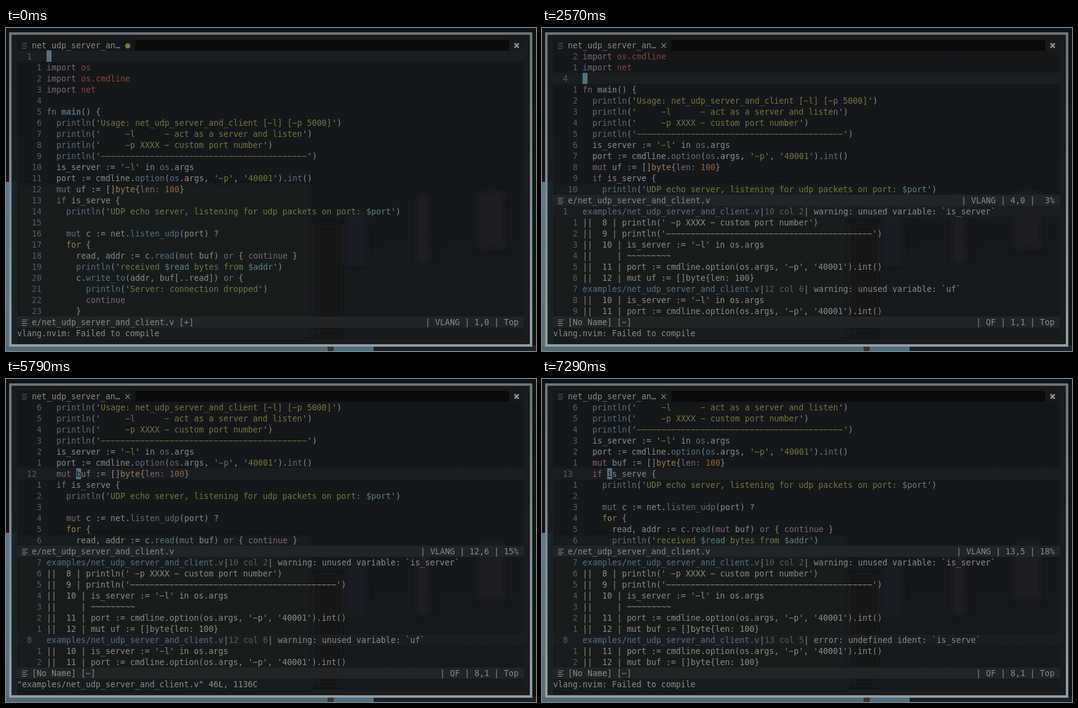
Animation of 862 by 525 pixels, one loop 8 s. Source, as an HTML page:

```html
<!DOCTYPE html>
<html lang="en">
<head>
<meta charset="utf-8">
<title>Editor session</title>
<style>
  html, body { margin: 0; width: 100%; height: 100%; overflow: hidden; background: #0d151a; }
  svg { display: block; width: 862px; height: 525px; }
  text { font: 13.288px "DejaVu Sans Mono", "Liberation Mono", monospace; white-space: pre; }
</style>
</head>
<body>
<svg viewBox="0 0 862 525" xmlns="http://www.w3.org/2000/svg">
  <defs>
    <linearGradient id="sky" x1="0" y1="0" x2="0" y2="1">
      <stop offset="0" stop-color="#4f7f95"/><stop offset="1" stop-color="#54737f"/>
    </linearGradient>
    <linearGradient id="edge" x1="0" y1="0" x2="0" y2="1">
      <stop offset="0" stop-color="#707476"/><stop offset="1" stop-color="#989c9e"/>
    </linearGradient>
    <linearGradient id="pane" x1="0" y1="0" x2="0" y2="1">
      <stop offset="0" stop-color="#141618"/><stop offset="1" stop-color="#15191c"/>
    </linearGradient>
    <filter id="soft"><feGaussianBlur stdDeviation="4"/></filter>
  </defs>
  <rect width="862" height="525" fill="#0d151a"/>
  <rect y="250" width="9" height="275" fill="url(#sky)"/>
  <rect y="516" width="523" height="9" fill="#4c6a77"/>
  <rect x="523" y="516" width="10" height="9" fill="#3a302d"/>
  <rect x="533" y="516" width="65" height="9" fill="#4a7083"/>
  <rect x="598" y="516" width="264" height="9" fill="#18242b"/>
  <rect x="7" y="9" width="847" height="507" fill="#171c1f"/>
  <rect x="9" y="250" width="9" height="264" fill="#1a252b"/>
  <rect x="18" y="19" width="824" height="486" fill="url(#pane)"/>
  <g filter="url(#soft)">
    <rect x="20" y="255" width="475" height="248" fill="#151b1f"/>
    <rect x="504" y="318" width="40" height="180" fill="#121619"/>
    <rect x="553" y="295" width="34" height="90" fill="#191d20"/>
    <rect x="668" y="272" width="20" height="110" fill="#1b1f22"/>
    <rect x="768" y="266" width="42" height="92" fill="#1a1e21"/>
  </g>
  <rect x="7" y="9" width="847" height="507" fill="none" stroke="url(#edge)" stroke-width="4"/>
  <g id="screen"></g>
</svg>
<script>
const LOOP = 8000, CELL = 8, ROW = 18, LEFT = 18, TOP = 19, TEXT_X = 66;
const COLORS = {
  f: '#8a8c8a', p: '#7b6880', r: '#854640', b: '#586f82', o: '#8f6440',
  y: '#94804f', g: '#727840', c: '#5f837f', n: '#565b5e', m: '#586f82'
};
const CURSOR = '#587083';
const screen = document.getElementById('screen');

// "^k" switches the colour to key k.
const rule = '-'.repeat(42);
const say = (pad, s) => `${pad}^bprintln^f('^g${s}^f')`;
const code = [
  '^pimport ^ros',
  '^pimport ^ros.cmdline',
  '^pimport ^rnet',
  '',
  '^pfn ^mmain^f() {',
  say('  ', 'Usage: net_udp_server_and_client [-l] [-p 5000]'),
  say('  ', '     -l      - act as a server and listen'),
  say('  ', '     -p XXXX - custom port number'),
  say('  ', rule),
  "  is_server := '^g-l^f' in ^bos^f.args",
  "  port := cmdline.^boption^f(^bos^f.args, '^g-p^f', '^g40001^f').^bint^f()",
  '  ^pmut^f uf := []^ybyte^f{^plen: ^o100^f}',
  '  ^pif^f is_serve {',
  say('    ', 'UDP echo server, listening for udp packets on port: ^c$port'),
  '',
  '    ^pmut^f c := net.^blisten_udp^f(port) ?',
  '    ^yfor^f {',
  '      read, addr := c.^bread^f(^pmut^f buf) ^por^f { ^pcontinue^f }',
  say('      ', 'received ^c$read^g bytes from ^c$addr'),
  '      c.^bwrite_to^f(addr, buf[..read]) ^por^f {',
  say('        ', 'Server: connection dropped'),
  '        ^pcontinue',
  '      }'
];
const before = ['', ...code];
const fixed = code.map(s => s.replace(' uf ', ' buf '));

const plain = s => s.replace(/\^./g, '');
const issue = (where, msg) => `^bexamples/net_udp_server_and_client.v^f|^n${where}^f| ${msg}`;
function report(src, where, msg) {
  const quote = n => `||  ${n} | ${plain(src[n - 1]).trim().replace(/\s+/g, ' ')}`;
  const at = parseInt(where) - 2;
  return [
    issue('10 col 2', 'warning: unused variable: `is_server`'),
    quote(8), quote(9), quote(10), '||     | ' + '~'.repeat(9), quote(11), quote(12),
    issue(where, msg), quote(at), quote(at + 1)
  ];
}
const unused = report(code, '12 col 6', 'warning: unused variable: `uf`');
const undef = report(fixed, '13 col 5', 'error: undefined ident: `is_serve`');

const failed = 'vlang.nvim: Failed to compile';
const wrote = '"examples/net_udp_server_and_client.v" 46L, 1136C';

// Each step changes some fields of the editor state.
const steps = [
  { t: 0, src: before, top: 1, line: 1, col: 0, pos: '1,0', pct: 'Top', dirty: true, cmd: failed },
  { t: 570, line: 2, pos: '2,1' },
  { t: 1140, line: 3, pos: '3,1' },
  { t: 1500, line: 4, pos: '4,1' },
  { t: 2570, src: code, top: 2, pos: '4,0', pct: ' 3%', dirty: false, list: unused, item: 1 },
  { t: 3710, top: 6, line: 12, col: 6, pos: '12,6', pct: '15%', item: 8 },
  { t: 5000, insert: true },
  { t: 5210, src: fixed, col: 7, pos: '12,7', dirty: true },
  { t: 5360, insert: false, col: 6 },
  { t: 5430, pos: '12,6' },
  { t: 5790, dirty: false, cmd: wrote },
  { t: 5860, list: undef, item: 1 },
  { t: 5930, cmd: failed },
  { t: 7290, top: 7, line: 13, col: 5, pos: '13,5', pct: '18%', item: 8 }
];
const states = [];
steps.forEach((s, i) => states.push({ ...states[i - 1], ...s }));

const rowY = r => TOP + r * ROW;
const escape = s => s.replace(/&/g, '&amp;').replace(/</g, '&lt;');
const rect = (x, y, w, h, fill) => `<rect x="${x}" y="${y}" width="${w}" height="${h}" fill="${fill}"/>`;
const bar = (r, fill, x = LEFT, end = 842) => rect(x, rowY(r), end - x, ROW, fill);

// The terminal face has wide hyphens, so they are set as minus signs.
function text(x, r, s, color = 'f') {
  let col = 0;
  const spans = ('^' + color + s).split('^').slice(1).map(part => {
    const key = part[0], body = part.slice(1);
    const span = `<tspan x="${x + col * CELL}" fill="${COLORS[key]}"` +
      `${key === 'm' ? ' font-weight="bold"' : ''}>${escape(body.replace(/-/g, '\u2212'))}</tspan>`;
    col += body.length;
    return body ? span : '';
  });
  return `<text y="${rowY(r) + 14}">${spans.join('')}</text>`;
}

function icon(r, color) {
  const y = rowY(r);
  return `<path d="M26 ${y + 5.5}h9M26 ${y + 8.5}h7M26 ${y + 11.5}h9M26 ${y + 14.5}h7" stroke="${color}"/>`;
}

const cross = (x, y, a, w) =>
  `<path d="M${x - a} ${y - a}l${2 * a} ${2 * a}m0 ${-2 * a}l${-2 * a} ${2 * a}" stroke="${COLORS.f}" stroke-width="${w}"/>`;

function status(r, name, info) {
  return bar(r, '#202427') + icon(r, COLORS.f) + text(42, r, name) +
    text(834 - info.length * CELL, r, info);
}

function lines(src, top, current, row, count) {
  let out = '';
  for (let i = 0; i < count; i++) {
    const n = top + i, here = n === current;
    const label = String(here ? n : Math.abs(n - current));
    if (here) out += bar(row + i, '#1a1d20');
    out += text(here ? 34 : 58 - label.length * CELL, row + i, label, 'n');
    out += text(TEXT_X, row + i, src[n - 1] || '');
  }
  return out;
}

function cursor(s) {
  const r = s.line - s.top + 1, x = TEXT_X + s.col * CELL;
  if (s.insert) return rect(x, rowY(r), 1, ROW, CURSOR);
  const ch = plain(s.src[s.line - 1])[s.col] || '';
  return rect(x, rowY(r), CELL, ROW, CURSOR) +
    `<text x="${x}" y="${rowY(r) + 14}" fill="#15181b">${escape(ch)}</text>`;
}

function draw(s) {
  const split = s.list ? 14 : 25;
  let out = bar(0, '#090b0c', 210, 818) + bar(0, '#17191b', 818) +
    icon(0, COLORS.n) + text(42, 0, 'net_udp_server_an…') + cross(830.5, 28.5, 3.4, 2.8);
  out += s.dirty ? `<circle cx="198" cy="29" r="4.3" fill="${COLORS.g}"/>` : cross(198, 28.5, 3.6, 1.2);
  out += lines(s.src, s.top, s.line, 1, split - 1) + cursor(s);
  out += status(split, 'e/net_udp_server_and_client.v' + (s.dirty ? ' [+]' : ''),
    `| VLANG | ${s.pos} | ${s.pct}`);
  if (s.list) {
    out += lines(s.list, 1, s.item, 15, 10) +
      status(25, '[No Name] [-]', `| QF | ${s.item},1 | Top`);
  }
  return out + text(LEFT, 26, s.cmd);
}

let shown = null;
function update(now) {
  const t = now % LOOP;
  const s = states.filter(x => x.t <= t).pop();
  if (s !== shown) {
    screen.innerHTML = draw(s);
    shown = s;
  }
}

const start = performance.now();
function tick() {
  update(performance.now() - start);
  requestAnimationFrame(tick);
}
tick();
</script>
</body>
</html>
```
